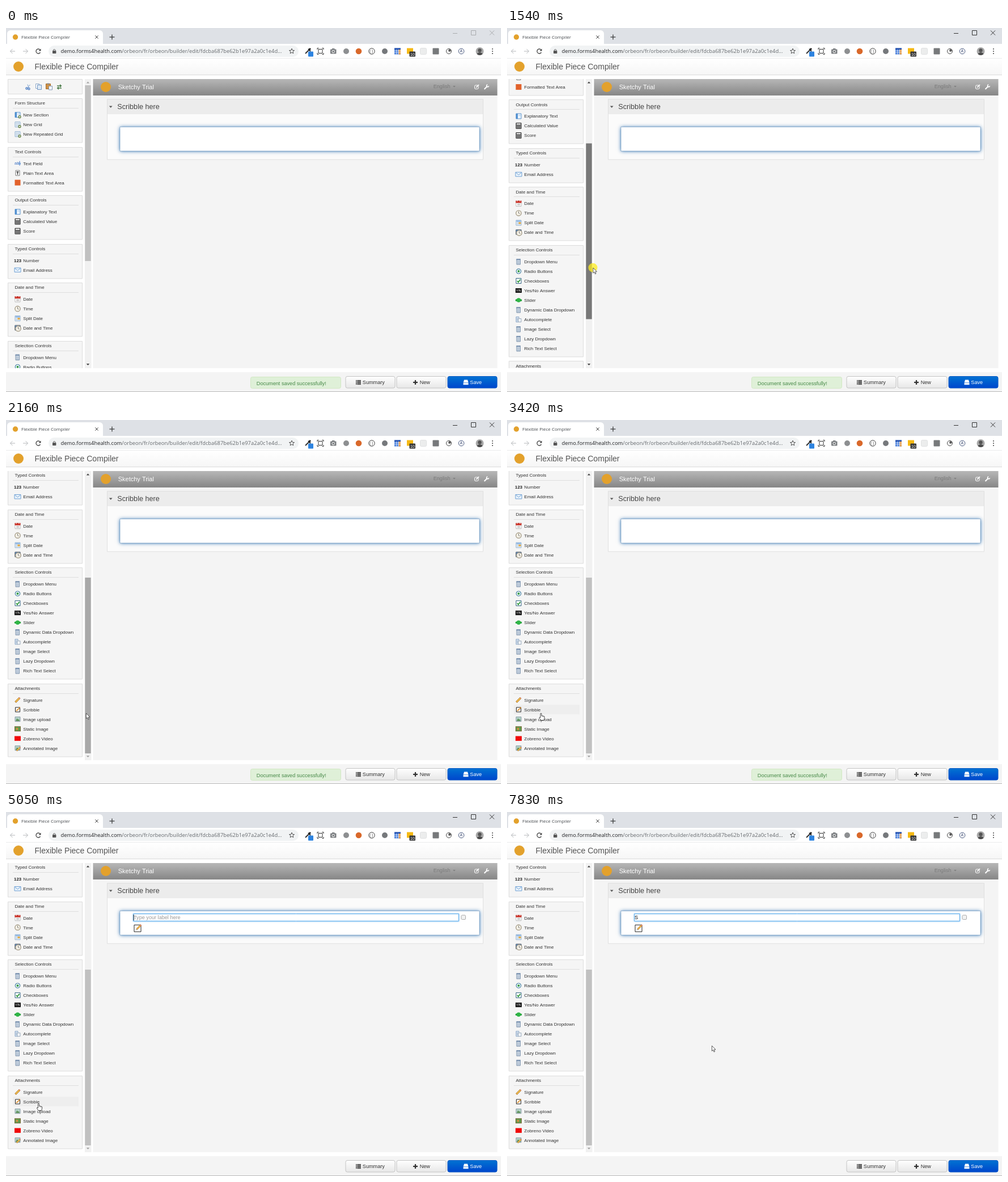
These frames come from a looping animation (873 px wide and 642 px high, 8000 ms). An HTML page with a canvas:

```html
<!DOCTYPE html>
<html lang="en">
<head>
<meta charset="utf-8">
<title>Form builder</title>
<style>
html, body { margin: 0; width: 100%; height: 100%; overflow: hidden; background: #fff; }
canvas { display: block; }
</style>
</head>
<body>
<canvas id="stage" width="873" height="642"></canvas>
<script>
const c = document.getElementById('stage').getContext('2d');
const LOOP = 8000, SCROLL_MAX = 291.5, TRACK = 177;
const ARIAL = '"Liberation Sans", Arial, sans-serif';
const UI = '"Open Sans", "Noto Sans", sans-serif';
const LOGO = '#e3a12c', APP = 'Flexible Piece Compiler';

// ---- drawing helpers ----
function rect(x, y, w, h, fill, stroke, r = 0) {
  c.beginPath();
  c.roundRect(x, y, w, h, r);
  if (fill) { c.fillStyle = fill; c.fill(); }
  if (stroke) { c.strokeStyle = stroke; c.lineWidth = 1; c.stroke(); }
}
function arc(x, y, r, from, to, color, w) {
  c.beginPath();
  c.arc(x, y, r, from, to);
  c.strokeStyle = color; c.lineWidth = w; c.stroke();
}
function disc(x, y, r, fill, stroke, w = 1) {
  c.beginPath();
  c.arc(x, y, r, 0, 7);
  if (fill) { c.fillStyle = fill; c.fill(); }
  if (stroke) { c.strokeStyle = stroke; c.lineWidth = w; c.stroke(); }
}
function trace(p) {
  c.beginPath();
  for (let i = 0; i < p.length; i += 2) c.lineTo(p[i], p[i + 1]);
}
function line(p, color, w = 1) {
  trace(p);
  c.strokeStyle = color; c.lineWidth = w; c.stroke();
}
function poly(p, fill, stroke, w = 1) {
  trace(p);
  c.closePath();
  c.fillStyle = fill; c.fill();
  if (stroke) { c.strokeStyle = stroke; c.lineWidth = w; c.stroke(); }
}
function text(s, x, y, size, color, font = ARIAL, weight = 'normal') {
  c.font = `${weight} ${size}px ${font}`;
  c.fillStyle = color;
  c.fillText(s, x, y);
}
function fade(y0, y1, a, b) {
  const g = c.createLinearGradient(0, y0, 0, y1);
  g.addColorStop(0, a);
  g.addColorStop(1, b);
  return g;
}
function at(x, y, draw) {
  c.save();
  c.translate(x, y);
  draw();
  c.restore();
}
function glow(color, blur, draw) {
  c.save();
  c.shadowColor = color;
  c.shadowBlur = blur;
  draw();
  c.restore();
}

// ---- icons, drawn around 0,0 ----
const pencil = () => {
  line([-4, 4, 3.5, -3.5], '#a9702a', 3.4);
  line([-3.5, 3.5, 3, -3], '#f3c050', 2.2);
  line([3, -3, 4, -4], '#d98b7a', 3);
};
const plus = () => {
  disc(3.5, 3.5, 2.6, '#5f7d3a');
  line([2, 3.5, 5, 3.5], '#fff');
  line([3.5, 2, 3.5, 5], '#fff');
};
const sheet = () => {
  rect(-4.5, -4.5, 9, 9, '#eaf3fc', '#5b93cc');
  rect(-4.5, -4.5, 3, 9, '#4f8fd0');
  line([-.5, -1.5, 4, -1.5], '#a9c9e8');
};
const table = () => {
  rect(-4.5, -4.5, 9, 9, '#f2f7fc', '#8fb0d0');
  for (const k of [-1.5, 1.5]) { line([-4.5, k, 4.5, k], '#b6cbe0'); line([k, -4.5, k, 4.5], '#b6cbe0'); }
};
const calendar = () => {
  rect(-4.5, -4.5, 9, 9.5, '#fff', '#bbb');
  rect(-5, -5, 10, 4, '#c93127');
  for (const k of [-2.5, 2.5]) rect(k - .5, -5.5, 1, 2, '#fff');
  for (const k of [-1.5, 1]) rect(k, 0, 1, 3.5, '#888');
};
const clock = () => {
  disc(0, 0, 4.7, '#f4f0e6', '#a39a86', 1.3);
  line([0, -3, 0, 0, 2, 1], '#666', .9);
};
const picture = () => {
  rect(-4.5, -4, 9, 8, '#b5d3c8', '#8b9aa6');
  poly([-3.5, 3, -1, -1.5, 1, 1, 2, -.5, 3.5, 3], '#5b8f55');
};
const scribble = () => {
  rect(-4, -3.8, 8, 8, '#fff', '#222');
  line([-2.5, 2.5, 1, -.5, 4.2, -4], '#d98d2b', 1.7);
};
const icon = {
  section() { sheet(); plus(); },
  grid() { table(); plus(); },
  sheet,
  field() { text('ab', -5.5, 2.5, 7.5, '#3b6fc0'); line([3.5, -4, 3.5, 4], '#3b6fc0'); rect(1, -1, 4.5, 3, '#7fa6da'); },
  area() { rect(-3.5, -4.5, 7, 9, '#fff', '#777'); line([-2, -2, 2, -2], '#222', 1.3); line([0, -2, 0, 3], '#222', 1.3); },
  rich() { rect(-5, -5, 10, 10, '#e2622b'); },
  calc() {
    rect(-5, -5.5, 10, 11, '#333', null, 1);
    rect(-3.7, -4.3, 7.4, 2.3, '#eee');
    for (let i = 0; i < 9; i++) rect(-3.7 + i % 3 * 2.8, -.8 + (i / 3 | 0) * 2, 1.8, 1.2, '#ddd');
  },
  number() { text('123', -6.4, 3.2, 7.8, '#222', ARIAL, 'bold'); },
  mail() { rect(-5.5, -3.7, 11, 7.5, '#eaf3fb', '#6fa0d4'); line([-5, -3, 0, 1, 5, -3], '#6fa0d4'); },
  calendar, clock,
  split() { table(); rect(-4, -4, 8, 2, '#8bb4e4'); rect(0, -1, 4, 3, '#e6a93c'); },
  datetime() { rect(-5, -5, 10, 9, '#557fae', '#8a8a8a', 1); at(1, 1, clock); },
  list() {
    rect(-3.5, -4.5, 6.5, 9.5, '#d9e2ec', '#7d93ab');
    rect(-4, -5, 7.5, 2.5, '#8299b5');
    for (const k of [-.5, 1.5, 3.5]) line([-2.5, k, 2, k], '#8da2ba', .8);
  },
  radio() { disc(0, 0, 4.2, '#f4fbfb', '#4e86a6', 1.2); disc(0, 0, 2, '#3a9a4b'); },
  check() { rect(-4.5, -4.5, 9, 9, '#fff', '#2d5f7f'); line([-2.5, 0, -.5, 2.3, 3, -2.5], '#2f9a3c', 1.8); },
  yesno() { rect(-5.5, -4, 11, 8, '#111'); text('Y/N', -4.6, 2, 5.2, '#fff'); },
  slider() { rect(-5.7, -1.7, 11.4, 3.6, '#27a23c', null, 1.5); disc(0, 0, 3.7, '#2fb546'); },
  auto() {
    rect(-4.5, -4.5, 5, 9, '#e5edf6', '#86a3c4');
    rect(-.5, -1.5, 5, 6, '#f3f6fa', '#9aaabb');
    for (const k of [-2, 0, 2]) line([-3.5, k, -1, k], '#7795b8', .8);
  },
  pencil, scribble, picture,
  still() { rect(-5.5, -4.5, 11, 9, '#7b6a38'); rect(-4.5, -3.5, 9, 7, '#5f9a4d'); disc(-1, 0, 2, '#d38b3d'); },
  video() { rect(-5.5, -4.2, 11, 8.4, '#f00a0a'); },
  annotate() { picture(); at(1.5, 1.5, () => { c.scale(.8, .8); pencil(); }); }
};

const groups = [
  ['Form Structure', 'section:New Section', 'grid:New Grid', 'grid:New Repeated Grid'],
  ['Text Controls', 'field:Text Field', 'area:Plain Text Area', 'rich:Formatted Text Area'],
  ['Output Controls', 'sheet:Explanatory Text', 'calc:Calculated Value', 'calc:Score'],
  ['Typed Controls', 'number:Number', 'mail:Email Address'],
  ['Date and Time', 'calendar:Date', 'clock:Time', 'split:Split Date', 'datetime:Date and Time'],
  ['Selection Controls', 'list:Dropdown Menu', 'radio:Radio Buttons', 'check:Checkboxes', 'yesno:Yes/No Answer',
    'slider:Slider', 'list:Dynamic Data Dropdown', 'auto:Autocomplete', 'list:Image Select',
    'list:Lazy Dropdown', 'list:Rich Text Select'],
  ['Attachments', 'pencil:Signature', 'scribble:Scribble', 'picture:Image upload', 'still:Static Image',
    'video:Zobreno Video', 'annotate:Annotated Image']
];

// ---- motion: time, x, y, eased ----
const path = [
  [70, 462, 533], [210, 133, 335], [400, 133, 335], [940, 147, 309.5, 1], [1330, 147, 309.5],
  [1420, 148, 325], [1560, 152, 438], [1700, 155, 493], [1990, 157, 515], [2090, 156, 517],
  [2160, 141, 517], [2860, 72, 517.5, 1], [2950, 70, 517], [3120, 70, 517], [3420, 60, 517],
  [3650, 58, 516], [3890, 58, 516], [3950, 57.5, 515], [4110, 57.5, 515], [4180, 57.5, 514],
  [5290, 57.5, 514], [6140, 360, 412, 1], [6300, 360, 412], [6370, 361, 412]
];
function pointer(t) {
  const i = path.findIndex(k => k[0] > t);
  if (i < 0) return path[path.length - 1].slice(1);
  if (i === 0) return path[0].slice(1);
  const a = path[i - 1], b = path[i];
  let u = (t - a[0]) / (b[0] - a[0]);
  if (b[3]) u = u * u * (3 - 2 * u);
  return [a[1] + (b[1] - a[1]) * u, a[2] + (b[2] - a[2]) * u];
}
// The thumb trails the dragging pointer a little.
function thumbShift(t) {
  if (t < 1330) return 0;
  if (t > 2000) return TRACK;
  return Math.min(TRACK, (pointer(t)[1] - 309.5) * .905);
}
const between = (t, a, b) => t >= a && t < b;

// ---- scene parts ----
function browser(t) {
  rect(0, 0, 873, 28, '#dee1e6');
  rect(2, 4, 169, 30, '#fff', null, 6);
  rect(0, 28, 873, 26, '#fff');
  disc(16.5, 16, 4.7, LOGO);
  text(APP, 27, 19, 8, '#45494d', UI);
  line([157.3, 13.3, 162.7, 18.7], '#444'); line([162.7, 13.3, 157.3, 18.7], '#444');
  line([182.5, 16, 191.5, 16], '#333', 1.2); line([187, 11.5, 187, 20.5], '#333', 1.2);
  const win = t < 1230 ? '#a9abae' : '#333';
  line([788, 9.5, 796, 9.5], win);
  rect(820.5, 4.5, 8, 8, null, win);
  line([853, 4.5, 861, 12.5], win); line([861, 4.5, 853, 12.5], win);

  line([16, 41, 7.5, 41], '#b5b7ba'); line([11.5, 37, 7.5, 41, 11.5, 45], '#b5b7ba');
  line([30, 41, 38.5, 41], '#b5b7ba'); line([34.5, 37, 38.5, 41, 34.5, 45], '#b5b7ba');
  arc(57, 41, 4, .5, 5.6, '#444', 1.3);
  poly([61.5, 36.5, 61.5, 40.5, 57.5, 40.5], '#444');
  rect(75, 31, 441, 20, '#f1f3f4', null, 10);
  rect(82, 40, 6.4, 5, '#555', null, .7);
  arc(85.2, 39.8, 2, Math.PI, 0, '#555', 1);
  const host = 'demo.forms4health.com';
  text(host, 96.5, 44, 9.35, '#202124', UI);
  text('/orbeon/fr/orbeon/builder/edit/fdcba687be62b1e97a2a0c1e4d...', 96.5 + c.measureText(host).width, 44, 9.35, '#666a6e', UI);
  const star = [];
  for (let i = 0; i < 10; i++) {
    const r = i % 2 ? 2.1 : 4.8, a = i * Math.PI / 5 - Math.PI / 2;
    star.push(504 + r * Math.cos(a), 41 + r * Math.sin(a));
  }
  poly(star, '#f1f3f4', '#555');
  extensions();
  rect(0, 53.5, 873, .7, '#d5d7da');
}

function extensions() {
  line([528, 45, 534, 39], '#333', 2); line([533, 37, 537, 41], '#222', 2); line([534.5, 38.5, 537, 36], '#222', 3);
  rect(533, 41.5, 9, 9, '#2d83e0', null, 1);
  rect(551, 37.5, 7, 7, null, '#333');
  for (const [x, s] of [[549, 1], [560, -1]]) {
    line([x, 38, x, 35.5, x + 2.5 * s, 35.5], '#333');
    line([x, 44, x, 46.5, x + 2.5 * s, 46.5], '#333');
  }
  rect(572, 37.5, 10.5, 8, '#7c7f82', null, 1); rect(575, 36, 4.5, 3, '#7c7f82');
  disc(577.2, 41.5, 2.3, null, '#fff');
  disc(600, 41, 5, '#8d8f91');
  disc(622, 41, 5.3, '#d9682a');
  disc(645, 41, 5.2, '#fff', '#444');
  text('( )', 641.3, 43.3, 6.5, '#444');
  disc(668, 41, 5, '#76797c');
  rect(685, 35.5, 11, 11, '#3f78d8');
  rect(685, 35.5, 11, 2.5, '#2c55ae'); rect(692.5, 38, 3.5, 8.5, '#e49a4a');
  for (const k of [688.5, 692]) line([k, 38, k, 46.5], '#fff', .7);
  for (const k of [40.5, 43.5]) line([685, k, 696, k], '#fff', .6);
  rect(707, 35.5, 11, 10, '#f5b914');
  rect(711.5, 41.5, 10.5, 9, '#333', null, 1);
  text('10', 713, 48.8, 7, '#fff');
  rect(730.5, 35.5, 11, 11, '#eceded', '#dfe0e1', 2);
  rect(752.5, 35.5, 11, 11, '#77797b', null, 1);
  disc(781, 41, 4.6, '#eee', '#555'); disc(782.5, 39.5, 2.2, '#555');
  disc(803, 41, 4.8, '#fff', '#4a5a80');
  text('A', 800.6, 43.4, 6.8, '#33446c');
  c.save();
  c.beginPath(); c.arc(835.5, 41, 7, 0, 7); c.clip();
  rect(828, 33, 15, 16, '#a8a8a8');
  disc(835.5, 39.5, 3.2, '#555'); disc(835.5, 49, 6, '#4a4a4a');
  c.restore();
  for (const k of [37, 41, 45]) disc(858, k, 1, '#444');
}

function header() {
  rect(0, 54, 873, 28.5, fade(54, 83, '#fff', '#f6f6f6'));
  rect(0, 82.3, 873, 1, '#d8d8d8');
  disc(22, 68, 9, LOGO);
  text(APP, 50.5, 73, 14.1, '#555');
}

function toolbox() {
  rect(3.5, 90.5, 131, 26, '#f5f5f5', '#dcdcdc');
  at(39, 104, () => {
    line([-1, -4.5, 1, 1], '#7ba0cf'); line([3.5, -4, -1, 1.5], '#7ba0cf');
    disc(-2.5, 2.5, 1.6, null, '#3f74c0', 1.2); disc(1.5, 3.3, 1.6, null, '#3f74c0', 1.2);
  });
  rect(52.5, 98.5, 6, 8, '#fff', '#8ba6c6'); rect(55.5, 100.5, 7, 8, '#dfeaf6', '#6f95c2');
  rect(70.5, 98.5, 8, 9, '#cf9145', '#a66c2a'); rect(72.5, 97.5, 4, 2, '#888'); rect(75.5, 102.5, 6, 6.5, '#f7f9fc', '#8299b5');
  line([90, 102, 96, 102], '#4c7d4a', 1.5); poly([95, 99, 98.5, 102, 95, 105], '#4c7d4a');
  line([92, 106, 98, 106], '#4c7d4a', 1.5); poly([93, 103, 89.5, 106, 93, 109], '#4c7d4a');
}

// Draws the scrolling list; tells whether the pointer is over an entry.
function sidebar(t, [px, py], shift) {
  let hot = false;
  c.save();
  c.beginPath(); c.rect(0, 90, 138, 510); c.clip();
  const top = -shift / TRACK * SCROLL_MAX;
  at(0, top, toolbox);
  let y = 124 + top;
  for (const [title, ...items] of groups) {
    const by = Math.round(y) + .5;
    rect(3.5, by, 131, 26.5 + 17 * items.length, '#f5f5f5', '#dcdcdc');
    text(title, 15.5, y + 11.2, 8, '#333');
    rect(12, Math.round(y + 17), 116, 1, '#dedede');
    items.forEach((item, i) => {
      const [kind, label] = item.split(':'), mid = y + 29.2 + 17 * i;
      if (px >= 12 && px < 128 && py >= mid - 8.5 && py < mid + 8.5 && t > 2090) {
        hot = true;
        rect(12, mid - 8.5, 116, 17, between(t, 4350, 4890) ? '#e6e6e6' : '#eeeeee');
      }
      at(20.5, mid, icon[kind]);
      text(label, 30.3, mid + 2.9, 8, '#333');
    });
    y += 34.5 + 17 * items.length;
  }
  c.restore();

  rect(139, 90, 11.5, 510, '#f1f1f1');
  const held = between(t, 1230, 2090);
  const over = t > 70 && px >= 139 && px <= 150 && py > 101 + shift && py < 411 + shift;
  rect(139.3, 101 + shift, 10.4, 310, held ? '#787878' : over ? '#a8a8a8' : '#c1c1c1');
  poly([141.8, 97.5, 144.5, 94.5, 147.2, 97.5], shift ? '#404040' : '#a3a3a3');
  poly([141.8, 592, 144.5, 595, 147.2, 592], shift < TRACK ? '#404040' : '#a3a3a3');
  return hot;
}

function form(t) {
  rect(153.5, 90, 713, 510, '#f4f4f4');
  rect(153.5, 90, 713, 29, fade(90, 119, '#b7b7b7', '#868686'));
  disc(176, 104, 9, LOGO);
  text('Sketchy Trial', 197.7, 108, 11, '#fff');
  text('English', 753.7, 106, 9.15, '#7a7a7a');
  poly([788, 102, 793, 102, 790.5, 104.5], '#808080');
  rect(826.5, 101, 6.5, 6.5, null, '#fff', 1.5);
  line([829, 105, 834, 100], '#fff', 1.7);
  line([843.5, 108, 849, 102.5], '#fff', 2);
  arc(849.5, 101.8, 2, .2, 4.6, '#fff', 1.6);

  rect(178, 126, 664, 106, '#fbfbfb');
  rect(178, 126, 664, 26, '#ececec');
  rect(178.5, 125.5, 663, 106.5, null, '#e0e0e0');
  poly([181.8, 137.5, 187.6, 137.5, 184.7, 140.7], '#555');
  text('Scribble here', 196.3, 143, 12.65, '#444');

  glow('#1f66ab', 6.5, () => rect(201, 174.5, 634, 42.5, '#fff'));
  rect(201, 174.5, 634, 42.5, null, 'rgba(70,120,170,.45)');
  if (t >= 4890) editor(t);
}

function editor(t) {
  glow('rgba(82,168,236,.6)', 3, () => rect(224.5, 179.5, 574, 13, '#fff', '#62b0ee'));
  const typed = t >= 7310;
  if (typed) text('S', 225, 189.2, 9.15, '#111');
  else text('Type your label here', 225, 189.2, 9.15, '#999');
  const caret = t < 5420 || between(t, 5960, 6510) || between(t, 6970, 7830);
  if (caret) rect(typed ? 230.5 : 224.6, 181, 1, 10.5, '#222');
  rect(803, 182, 7.5, 7.5, '#f2f2f2', '#aaa', 1.5);
  at(232, 204.7, () => {
    rect(-6, -5.5, 12, 12, '#fff', '#222');
    line([-3.5, 3.5, 0, 2], '#777', .8);
    line([-1.5, 2, 6, -5.5], '#a9702a', 3);
    line([-1, 1.5, 5, -4.5], '#f0b64a', 2);
    line([5, -4.5, 6.3, -5.8], '#d98b7a', 2.8);
  });
}

function button(x, label, tx, top, bottom, edge, ink) {
  rect(x + .5, 614.5, 87, 20.5, fade(614, 636, top, bottom), edge, 3);
  text(label, tx, 628, 9.15, ink);
}
function footer(t) {
  rect(0, 607, 873, 35, '#f4f4f4');
  rect(0, 641, 873, 1, '#b9b9b9');
  c.globalAlpha = Math.max(0, Math.min(1, (5030 - t) / 140));
  rect(431.5, 615.5, 159, 20, '#dff0d8', '#d2e8c4', 3);
  text('Document saved successfully!', 441.8, 629.5, 9.15, '#468847');
  c.globalAlpha = 1;
  button(598.5, 'Summary', 628.8, '#fff', '#e6e6e6', '#c4c4c4', '#333');
  button(688.5, 'New', 729.7, '#fff', '#e6e6e6', '#c4c4c4', '#333');
  button(778.5, 'Save', 818.3, '#0074d2', '#0044cc', '#0a58c4', '#fff');
  for (let i = 0; i < 4; i++) {
    rect(617, 621 + 2.2 * i, 1.6, 1.5, '#333');
    rect(619.3, 621 + 2.2 * i, 6.7, 1.5, '#333');
  }
  line([718, 625, 726, 625], '#333', 2.2); line([722, 621, 722, 629], '#333', 2.2);
  poly([808, 620.5, 814, 620.5, 815.5, 625.5, 806.5, 625.5], '#fff');
  rect(806.5, 626.2, 9, 3, '#fff');
}

function cursor(t, [x, y], hand) {
  if (t < 70) return;
  if (between(t, 1230, 2090) || between(t, 4350, 4580)) disc(x, y, 8, 'rgba(255,238,30,.74)');
  at(x, y, () => {
    if (hand) {
      poly([-1, 1, 0, 0, 1, 1, 1, 5, 2.5, 4.6, 4, 5.2, 5.8, 5.7, 6.2, 7, 5.8, 10, 5, 12.5, -.5, 12.5, -3, 8.5, -2.6, 7.2, -1, 8], '#fff', '#222', .8);
      line([2.6, 5, 2.6, 7], '#555', .5); line([4.3, 5.4, 4.3, 7.2], '#555', .5);
    } else {
      poly([.4, .3, .4, 9.6, 2.5, 7.7, 4, 11.2, 5.5, 10.5, 4.1, 7.2, 7, 7], '#fff', '#333', .8);
    }
  });
}

function frame(now) {
  const t = now % LOOP, pos = pointer(t), shift = thumbShift(t);
  rect(0, 0, 873, 642, '#fff');
  browser(t);
  header();
  const hot = sidebar(t, pos, shift);
  form(t);
  footer(t);
  cursor(t, pos, hot);
}
const start = performance.now();
function tick() {
  frame(performance.now() - start);
  requestAnimationFrame(tick);
}
tick();
</script>
</body>
</html>
```
